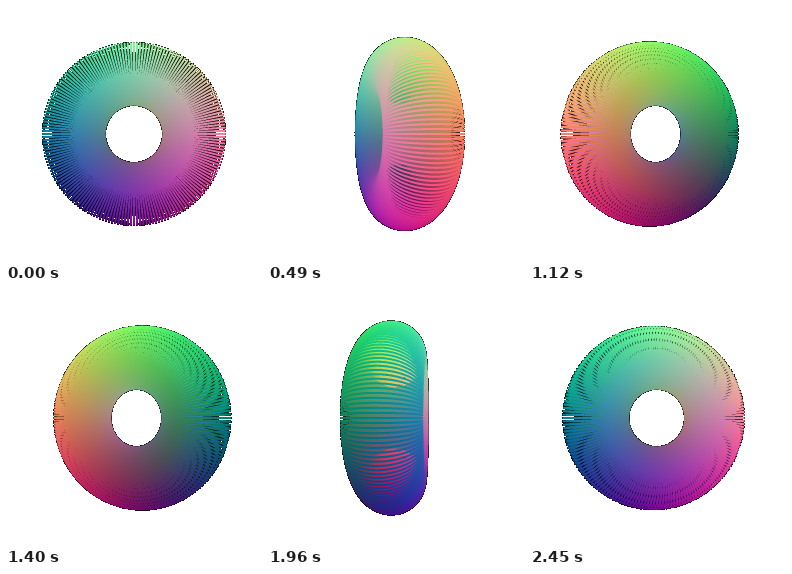
Write an HTML page with a canvas that moves like this. It is 256 px wide and 256 px high and loops after 2.52 s.

```html
<!DOCTYPE html>
<html>
<head>
<meta charset="utf-8">
<style>
html, body { margin: 0; width: 100%; height: 100%; overflow: hidden; background: #fff }
canvas { display: block; width: 256px; height: 256px }
</style>
</head>
<body>
<canvas id="stage" width="256" height="256"></canvas>
<script>
const SIZE = 256, SS = 3, WIDE = SIZE * SS;
const EYE = 128 / Math.tan(Math.PI / 6);   // 60 degree field of view
const MAJOR = 59, MINOR = 29.5, RINGS = 180, STEPS = 300, STROKE = 2.1;
const FRAMES = 36, FRAME_MS = 70;

const ctx = stage.getContext('2d');
const image = ctx.createImageData(SIZE, SIZE);
const depth = new Float32Array(WIDE * WIDE);
const color = new Uint32Array(WIDE * WIDE);
const channel = v => Math.round(127.5 * (1 + v / (MAJOR + MINOR)));

// The torus is a wire of closely spaced rings, coloured by position.
const points = [];
for (let i = 0; i < RINGS; i++) {
  const u = i / RINGS * 2 * Math.PI;
  for (let j = 0; j < STEPS; j++) {
    const v = j / STEPS * 2 * Math.PI, r = MAJOR + MINOR * Math.cos(v);
    const x = r * Math.cos(u), y = r * Math.sin(u), z = MINOR * Math.sin(v);
    points.push({ x, y, z, rgb: channel(x) | channel(y) << 8 | channel(z) << 16 });
  }
}

function splat(cx, cy, radius, z, rgb) {
  for (let y = Math.ceil(cy - radius - .5); y + .5 <= cy + radius; y++)
    for (let x = Math.ceil(cx - radius - .5); x + .5 <= cx + radius; x++) {
      const dx = x + .5 - cx, dy = y + .5 - cy, k = y * WIDE + x;
      if (dx * dx + dy * dy <= radius * radius && z > depth[k]) {
        depth[k] = z;
        color[k] = rgb;
      }
    }
}

// Partly covered pixels darken towards black; empty ones stay white.
function resolve() {
  const n = SS * SS;
  for (let y = 0; y < SIZE; y++)
    for (let x = 0; x < SIZE; x++) {
      let r = 0, g = 0, b = 0, hits = 0;
      for (let s = 0; s < n; s++) {
        const k = (y * SS + (s / SS | 0)) * WIDE + x * SS + s % SS, c = color[k];
        if (depth[k] === -Infinity) continue;
        hits++;
        r += c & 255;
        g += c >> 8 & 255;
        b += c >> 16;
      }
      image.data.set(hits ? [r / n, g / n, b / n, 255] : [255, 255, 255, 255], (y * SIZE + x) * 4);
    }
  ctx.putImageData(image, 0, 0);
}

function draw(frame) {
  const angle = frame / FRAMES * 2 * Math.PI, c = Math.cos(angle), s = Math.sin(angle);
  depth.fill(-Infinity);
  for (const p of points) {
    const z = p.x * s + p.z * c, scale = EYE / (EYE - z) * SS;
    splat(WIDE / 2 + (p.x * c - p.z * s) * scale, WIDE / 2 - p.y * scale,
      STROKE / 2 * SS, z, p.rgb);
  }
  resolve();
}

let shown = -1;
function tick() {
  const frame = Math.floor(performance.now() / FRAME_MS) % FRAMES;
  if (frame !== shown) draw(shown = frame);
  requestAnimationFrame(tick);
}
tick();
</script>
</body>
</html>
```
